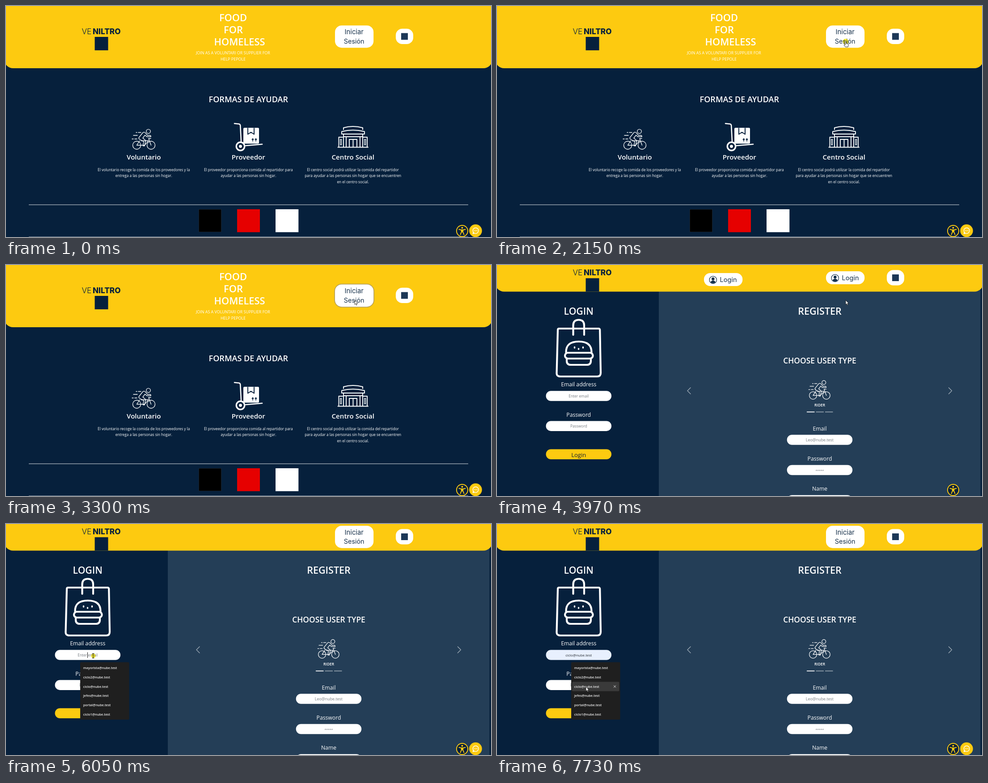
An HTML page with a canvas that plays this animation: 1085 px wide and 516 px high, repeating every 8000 ms.

```html
<!DOCTYPE html>
<html lang="es">
<head>
<meta charset="utf-8">
<title>Formas de ayudar</title>
<style>
  html, body { margin: 0; width: 100%; height: 100%; overflow: hidden; background: #06203c; }
  canvas { display: block; width: 1085px; height: 516px; }
</style>
</head>
<body>
<canvas id="stage" width="1085" height="516"></canvas>
<script>
const ctx = document.getElementById('stage').getContext('2d');
const LOOP = 8000;
const NAVY = '#06203c', YELLOW = '#fdca10', PANEL = '#243e57', WHITE = '#fff';
const SANS = '"Open Sans", "Noto Sans", sans-serif';
const WIDE = 'Inter, "Open Sans", sans-serif';

// Pointer path: time, x, y
const KEYS = [
  [190, 1052, 504], [950, 828, 130], [1160, 806, 97], [1290, 806, 97],
  [1490, 780, 79], [4100, 780, 79], [4310, 765, 83], [4590, 604, 119],
  [4660, 400, 200], [4730, 215, 280], [4800, 125, 290], [5060, 125, 290],
  [5320, 195, 290], [7450, 195, 290], [7730, 199, 364]
];
const STEP = 69;
const MAILS = ['mayorista', 'ciclo2', 'ciclo', 'jefes', 'portal', 'ciclo1'].map(n => n + '@nube.test');
const ROW_TOP = 311.5, ROW_H = 20.65;

// ---------- helpers ----------
function text(str, x, y, size, { weight = 400, color = WHITE, align = 'center', family = SANS } = {}) {
  ctx.font = `${weight} ${size}px ${family}`;
  ctx.textAlign = align;
  ctx.fillStyle = color;
  ctx.fillText(str, x, y);
}

function box(x, y, w, h, r, color) {
  ctx.fillStyle = color;
  ctx.beginPath();
  ctx.roundRect(x, y, w, h, r);
  ctx.fill();
}

function frame(x, y, w, h, r) {
  ctx.beginPath();
  ctx.roundRect(x, y, w, h, r);
  ctx.stroke();
}

function disc(x, y, r, color) {
  ctx.fillStyle = color;
  ctx.beginPath();
  ctx.arc(x, y, r, 0, 7);
  ctx.fill();
}

function ring(x, y, r) {
  ctx.beginPath();
  ctx.arc(x, y, r, 0, 7);
  ctx.stroke();
}

function pen(color, width) {
  ctx.strokeStyle = color;
  ctx.lineWidth = width;
  ctx.lineCap = ctx.lineJoin = 'round';
}

const stroke = d => ctx.stroke(new Path2D(d));

function fill(d, color) {
  ctx.fillStyle = color;
  ctx.fill(new Path2D(d));
}

function at(x, y, scale, draw) {
  ctx.save();
  ctx.translate(x, y);
  ctx.scale(scale, scale);
  draw();
  ctx.restore();
}

// ---------- icons ----------
function cyclist() {
  pen(WHITE, 1.35);
  ring(10.5, 37, 9);
  ring(42.5, 37, 9);
  ring(36.5, 6, 4.7);
  stroke('M10.5 37L17 27M20 27H37L28 37H10.5M42.5 37L37 22H42');
  stroke('M16 19L24 9Q27 6.5 30 9.5L34.5 15H40Q42.5 15.5 42 18H33L29 14.5L24 21L30.5 26.5L28 38.5H24.5L26 29L16.5 23.5Q14 21.5 16 19Z');
  stroke('M14 8.5H20M9 8.5H11M3 15H12M0 23H3M6 23H11');
}

function trolley() {
  pen(WHITE, 2.6);
  stroke('M511 262.5L521 263.5Q524 264 524.2 267L526 302');
  stroke('M536 312L573 308.8');
  pen(WHITE, 3.4);
  ring(524.5, 313.5, 9.2);
  disc(524.5, 313.5, 3.4, WHITE);
  box(531, 272, 35, 35.5, 2.5, WHITE);
  pen(NAVY, 2);
  stroke('M541 273V286.5L548 282L555 286.5V273');
  pen(NAVY, 1.6);
  stroke('M552 302V297M550.3 298.2L552 296.3L553.7 298.2M559 302V297M557.3 298.2L559 296.3L560.7 298.2');
}

function building() {
  pen(WHITE, 1.9);
  stroke('M742.5 315.5H810M744.5 315V293H753M808 315V293H799');
  stroke('M755 276V272Q776 266 798 272V276');
  stroke('M751 286V280.5Q776 274 802 280.5V286Z');
  stroke('M755 286V315M798 286V315M761 292V315M792 292V315M755 292H798');
  stroke('M768 315V298H785V315M776.5 298V315');
  pen(WHITE, 1.3);
  for (const x of [748, 802]) stroke(`M${x} 298V310H${x + 2.5}V298Z`);
}

function bag() {
  pen(WHITE, 4.2);
  stroke('M139 142H227Q230 142 230.2 145L232 241Q232 249 224 249H142Q133 249 133.5 241L136 145Q136 142 139 142Z');
  stroke('M170.5 156V135Q170.5 122.5 182.8 122.5Q195 122.5 195 135V156');
  stroke('M154.5 195Q154 171 183 171Q211.5 171 211.5 195');
  frame(152, 196, 62.5, 13, 6.5);
  stroke('M156 210V214Q156 223 165 223H201Q210 223 210 214V210');
  pen(WHITE, 3.4);
  stroke('M173.5 183.5V185M182.5 187V188M192.5 183.5V185');
}

function accessIcon() {
  disc(1020.5, 502.5, 13.5, YELLOW);
  disc(1020.5, 502.5, 11.6, NAVY);
  disc(1020.5, 495.5, 2, YELLOW);
  pen(YELLOW, 1.9);
  stroke('M1013.5 499L1018.5 500.3H1022.5L1027.5 499M1018.8 500.5V505L1016.5 510.5M1022.2 500.5V505L1024.5 510.5');
  box(1018, 499.5, 5, 6, 1, YELLOW);
}

function chatIcon() {
  disc(1050.5, 502, 14.3, YELLOW);
  pen(WHITE, 1.4);
  ring(1050.7, 501.8, 6.3);
  stroke('M1045.4 505.5L1044.6 508.6L1048 507.6');
  for (const x of [1047.8, 1050.7, 1053.6]) disc(x, 502, 0.9, WHITE);
}

function userIcon(x, y) {
  pen('#14304b', 1.2);
  ring(x, y, 8.2);
  disc(x, y - 2.2, 3.3, '#14304b');
  ctx.save();
  ctx.beginPath();
  ctx.arc(x, y, 7.6, 0, 7);
  ctx.clip();
  disc(x, y + 7, 5.8, '#14304b');
  ctx.restore();
}

// ---------- header ----------
const DARK = { color: '#18324c', family: WIDE };

function header(bottom, dy) {
  box(-4, -40, 1092, bottom + 40, 20, YELLOW);
  text('VE', 169.5, 62.7 + dy, 17.2, { weight: 300, color: NAVY, family: WIDE, align: 'left' });
  text('NILTRO', 256.5, 62.7 + dy, 17.2, { weight: 800, color: NAVY, family: WIDE, align: 'right' });
  box(198.5, 69 + dy, 30, 30, 0, NAVY);
  box(872, 50.7 + dy, 39, 34.3, 14.5, WHITE);
  box(884, 60.5 + dy, 15, 15, 0, '#1d3857');
}

function signIn(dy) {
  box(736, 43.4 + dy, 86.2, 49.8, 15, WHITE);
  text('Iniciar', 778.7, 63 + dy, 14.8, DARK);
  text('Sesión', 778.7, 83.5 + dy, 14.4, DARK);
}

function loginPill(x, y) {
  box(x, y, 86.3, 29, 14, WHITE);
  userIcon(x + 20.3, y + 15.3);
  text('Login', x + 54.5, y + 19.6, 14.6, DARK);
}

// ---------- pages ----------
function card(x, title, lines) {
  text(title, x, 342.7, 15.1, { weight: 600 });
  lines.forEach((line, i) => text(line, x, 368.6 + i * 13.8, 8.28));
}

function homePage(t) {
  header(139, 0);
  const focus = Math.min(1, Math.max(0, (t - 2150) / 200));
  if (focus) {
    ctx.globalAlpha = focus;
    box(734.2, 41.8, 89.9, 53.2, 17, '#baa354');
    ctx.globalAlpha = 1;
  }
  signIn(0);

  text('FOOD', 508, 33.5, 21.9, { weight: 600 });
  text('FOR', 508.5, 61, 21.9, { weight: 600 });
  text('HOMELESS', 522.5, 88.3, 21.8, { weight: 600 });
  text('JOIN AS A VOLUNTARI OR SUPPLIER FOR', 507.8, 107.7, 8.94);
  text('HELP PEPOLE', 508, 121.7, 8.94);

  text('FORMAS DE AYUDAR', 542.3, 214.7, 18, { weight: 600 });
  at(282, 274, 1, cyclist);
  trolley();
  building();
  card(308.2, 'Voluntario', [
    'El voluntario recoge la comida de los proveedores y la',
    'entrega a las personas sin hogar.']);
  card(542.3, 'Proveedor', [
    'El proveedor proporciona comida al repartidor para',
    'ayudar a las personas sin hogar.']);
  card(776.2, 'Centro Social', [
    'El centro social podrá utilizar la comida del repartidor',
    'para ayudar a las personas sin hogar que se encuentren',
    'en el centro social.']);

  box(51, 443.4, 983, 1, 0, '#dfe4e8');
  box(51, 515, 983, 1, 0, '#8494a4');
  box(431, 454, 51, 51, 0, '#2b3440');
  box(431.6, 454.6, 49.8, 49.8, 0, '#000');
  box(517, 454, 51, 51.3, 0, '#e60000');
  box(603, 454, 51.3, 51.3, 0, WHITE);
  accessIcon();
  chatIcon();
}

function field(x, y, hint, size, color = '#757b81', bg = WHITE) {
  box(x, y, 146.5, 22.5, 11.2, bg);
  text(hint, x + 73.2, y + 14.8, size, { color });
}

function accountPage(t, row) {
  box(362, 40, 719.5, 476, 0, PANEL);
  header(59.5, -39.5);
  if (t < 4100) {
    loginPill(463, 18);
    loginPill(736, 14);
  } else {
    signIn(-39.5);
  }

  text('LOGIN', 182.7, 111, 21.2, { weight: 600 });
  bag();
  text('Email address', 182.7, 271.3, 12.2);
  if (row >= 0) field(109.5, 281.2, MAILS[row], 8, '#22272c', '#e8f0fe');
  else field(109.5, 281.2, 'Enter email', 8.5);
  text('Password', 182.7, 339, 12.2);
  field(109.5, 348.4, 'Password', 8.4);
  box(109.5, 411.5, 146.5, 22.5, 11.2, YELLOW);
  text('Login', 182.7, 428.5, 13, { color: '#10202f' });

  text('REGISTER', 722, 111, 21.5, { weight: 600 });
  text('CHOOSE USER TYPE', 722, 220, 17.4, { weight: 600 });
  at(697.3, 257, 0.93, cyclist);
  text('RIDER', 722, 315.6, 8.3, { weight: 600 });
  [693, 713.5, 734].forEach((x, i) => box(x, 327.4, 17.5, 1.8, 0, i ? '#919fab' : WHITE));
  pen('#a4b0ba', 1.3);
  stroke('M433 274L426 281L433 288M1010.5 274L1017.5 281L1010.5 288');
  text('Email', 722, 369.6, 12.2);
  field(648.7, 379.3, 'Leo@nube.test', 8.9);
  text('Password', 722, 437.2, 12.2);
  field(648.7, 446.7, '*****', 6.8);
  text('Name', 722, 504.3, 12.2);
  box(648.7, 514, 146.5, 22.5, 11.2, WHITE);

  accessIcon();
  if (t >= 4800) chatIcon();
  if (t >= 6050) suggestions(row);
  if ((t >= 6050 && t < 6590) || (t >= 7060 && t < 7520)) box(182, 286.5, 1, 12.5, 0, '#111');
}

function suggestions(row) {
  box(166, 308.8, 109.5, 128.2, 2, '#1f1f1f');
  if (row >= 0) {
    const y = ROW_TOP + row * ROW_H;
    box(168, y - 0.3, 105.5, 21, 2, '#3a3a3a');
    pen('#e4e4e4', 1);
    at(263.5, y + 10.2, 1, () => stroke('M-2.2 -2.2L2.2 2.2M2.2 -2.2L-2.2 2.2'));
  }
  MAILS.forEach((mail, i) =>
    text(mail, 172.8, 324.3 + i * ROW_H, 7.3, { weight: 600, color: '#f0f0f0', align: 'left' }));
}

// ---------- pointer ----------
function pointerAt(t) {
  if (t < KEYS[0][0]) return null;
  let i = KEYS.length - 1;
  while (KEYS[i][0] > t) i--;
  const [t0, x0, y0] = KEYS[i];
  if (i === KEYS.length - 1) return { x: x0, y: y0 };
  const [t1, x1, y1] = KEYS[i + 1];
  const held = Math.floor((t - t0) / STEP) * STEP;
  let p = Math.min(1, held / (t1 - t0));
  if (i === 0) p = 1 - (1 - p) ** 2;
  return { x: x0 + (x1 - x0) * p, y: y0 + (y1 - y0) * p };
}

function arrow() {
  const d = 'M0 0V9.3L2.2 7.3L3.7 10.7L5.3 10L3.8 6.7H6.6Z';
  fill(d, WHITE);
  pen('#1a1a1a', 0.8);
  stroke(d);
}

function hand() {
  const d = 'M-1.2 0.5Q0 -1.2 1 0.5V4.6L5 5.3Q6.4 5.7 6.2 7.2L5.2 12.5H-0.7L-3.7 8.2Q-3.8 6.6 -2.2 7L-1.2 8Z';
  fill(d, WHITE);
  pen('#1a1a1a', 0.9);
  stroke(d);
}

function beam() {
  pen('#111', 1);
  stroke('M-2 -0.5H2M-2 9.5H2M0 -0.5V9.5');
}

function clickGlow(t, start, length, x, y, r) {
  const p = (t - start) / length;
  if (p < 0 || p >= 1) return;
  ctx.globalCompositeOperation = 'multiply';
  ctx.globalAlpha = 0.85 * (1 - p);
  disc(x, y, r, '#fff01e');
  ctx.globalAlpha = 1;
  ctx.globalCompositeOperation = 'source-over';
}

function shapeAt(t) {
  if (t >= 1430 && t < 3300) return hand;
  return t >= 4800 && t < 7320 ? beam : arrow;
}

function draw(now) {
  const t = now % LOOP;
  const p = pointerAt(t);
  const row = t >= 7500 ? Math.floor((p.y - ROW_TOP) / ROW_H) : -1;

  ctx.fillStyle = NAVY;
  ctx.fillRect(0, 0, 1085, 516);
  if (t < 3970) homePage(t);
  else accountPage(t, row);

  clickGlow(t, 2150, 340, 780, 79.5, 6.5);
  clickGlow(t, 6050, 210, 195.5, 294.5, 5);
  if (p) at(p.x, p.y, 1, shapeAt(t));
}

function loop() {
  draw(performance.now());
  requestAnimationFrame(loop);
}
loop();
</script>
</body>
</html>
```
